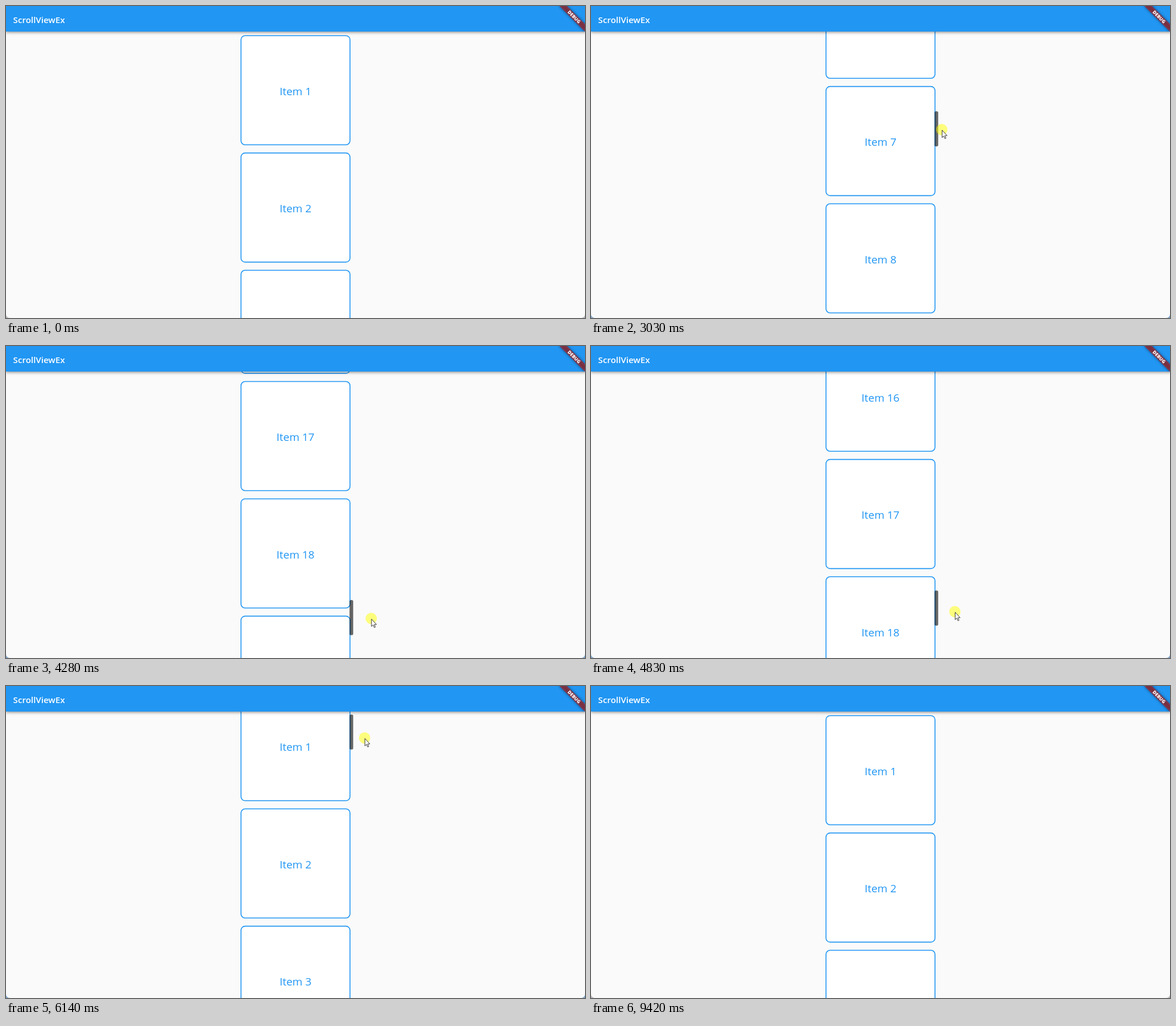
An HTML page for the animation above (9550 ms loop, 1020 px wide and 549 px high).

```html
<!DOCTYPE html>
<html lang="en">
<head>
<meta charset="utf-8">
<title>ScrollViewEx</title>
<style>
  html, body { margin: 0; width: 100%; height: 100%; overflow: hidden; background: #fafafa; }
  #stage { position: relative; width: 1020px; height: 549px; overflow: hidden; }
  svg { position: absolute; left: 0; top: 0; font-family: "Open Sans", "Noto Sans", sans-serif; }
  #bar {
    position: absolute; left: 0; top: 0; width: 1020px; height: 45px; background: #2196f3;
    box-shadow: 0 1.6px 3.2px -.8px rgba(0,0,0,.2), 0 3.2px 4px rgba(0,0,0,.14), 0 .8px 8px rgba(0,0,0,.12);
  }
  #edge { position: absolute; inset: 0; border-radius: 0 0 7px 7px; box-shadow: 0 0 0 10px; }
</style>
</head>
<body>
<div id="stage">
  <svg width="1020" height="549">
    <g id="list" fill="#2196f3" font-size="19" text-anchor="middle"></g>
    <rect id="thumb" x="605.2" width="6.4" height="61.6" rx="2.5"/>
  </svg>
  <div id="bar"></div>
  <svg width="1020" height="549">
    <text x="12.6" y="30" font-size="15.2" font-weight="600" fill="#fff">ScrollViewEx</text>
    <g transform="translate(1020 0) rotate(45)">
      <rect x="-32" y="22.4" width="64" height="9.6" fill="rgba(0,0,0,.5)" style="filter: blur(2.6px)"/>
      <rect x="-32" y="22.4" width="64" height="9.6" fill="rgba(183,28,28,.627)"/>
      <text y="30.1" font-size="8.16" font-weight="800" fill="#fff" text-anchor="middle">DEBUG</text>
    </g>
    <g id="cursor">
      <circle id="press" cy="-.5" r="10" fill="#ff0" fill-opacity=".5"/>
      <path d="M.5 .5V13.5L3.4 10.8L5.4 15.4L7.3 14.6L5.4 10.1H9.3Z" fill="#fff" stroke="#222" stroke-width=".9"/>
    </g>
  </svg>
  <div id="edge"></div>
</div>
<script>
const LOOP = 9550, STEP = 70;
const PITCH = 206.4, ITEMS = 20, VIEW_TOP = 45, VIEW_HEIGHT = 504.2;
const el = id => document.getElementById(id);

el('list').innerHTML = Array.from({ length: ITEMS }, (_, i) => `
  <g transform="translate(0 ${i * PITCH})">
    <rect x="414" y="52.2" width="192" height="192" rx="7.2" fill="#fff" stroke="#2196f3" stroke-width="1.6"/>
    <text x="510" y="156.8">Item ${i + 1}</text>
  </g>`).join('');

const linear = u => u;
const easeIn = p => u => u ** p;
const easeOut = p => u => 1 - (1 - u) ** p;
const smooth = u => u * u * (3 - 2 * u);

// time, [cursor x, cursor y, scroll offset], easing towards the next key
const motion = [
  [310, [971, 528, 0], easeOut(1.6)],
  [1230, [599, 56, 0], smooth],
  [1720, [553, 227, 0], smooth],
  [2210, [609, 78, 0], linear],
  [2610, [609, 78, 0], easeIn(1.3)],
  [3030, [618, 218, 1149], easeOut(1.3)],
  [3530, [632, 397, 2662], linear],
  [3790, [632, 397, 2662], linear],
  [3860, [633, 399, 2681], smooth],
  [4560, [649, 524, 3624], linear],
  [4690, [649, 524, 3624], linear],
  [4830, [641, 468, 3155], easeOut(2)],
  [5240, [640, 420, 2758], linear],
  [5370, [640, 420, 2758], easeIn(1.3)],
  [5720, [628, 158, 612], easeOut(2.5)],
  [6360, [632, 87, 0], linear],
  [6490, [632, 87, 0], smooth],
  [7050, [679, 210, 0], linear],
  [7590, [679, 210, 0], easeIn(1.5)],
  [8360, [957, 537, 0], linear],
];

const thumbOpacity = [
  [2140, [0], linear],
  [2420, [.5], linear],
  [2610, [.5], linear],
  [2680, [.6], linear],
  [6490, [.6], linear],
  [6700, [.1], linear],
  [6840, [.1], linear],
  [7050, [.03], linear],
  [7320, [.03], linear],
  [7390, [0], linear],
];

function sample(keys, t) {
  const next = keys.findIndex(key => key[0] > t);
  if (next === 0) return keys[0][1];
  if (next < 0) return keys.at(-1)[1];
  const [t0, from, ease] = keys[next - 1], [t1, to] = keys[next];
  const k = ease((t - t0) / (t1 - t0));
  return from.map((v, i) => v + (to[i] - v) * k);
}

// Movement advances in fixed steps counted from the start of each burst.
const bursts = [0, 310, 1300, 2280, 2680, 3860, 4760, 5440, 6560, 7390, 7660, 9420];
function stepped(t) {
  const start = bursts.findLast(b => b <= t);
  return start + Math.floor((t - start) / STEP) * STEP;
}

function draw(time) {
  const t = stepped(time);
  const [x, y, scroll] = sample(motion, t);
  el('list').setAttribute('transform', `translate(0 ${-scroll})`);
  el('thumb').setAttribute('y', VIEW_TOP + scroll * VIEW_HEIGHT / (PITCH * ITEMS));
  el('thumb').setAttribute('fill-opacity', sample(thumbOpacity, t)[0]);
  el('cursor').setAttribute('transform', `translate(${x} ${y})`);
  el('cursor').style.display = time >= 310 && time < 8430 ? '' : 'none';
  el('press').style.display = time >= 2680 && time < 6560 ? '' : 'none';
  el('edge').style.color = time >= 2680 && time < 9420 ? '#7fa8cf' : '#b8b8b8';
}

const began = performance.now();
function frame() {
  draw((performance.now() - began) % LOOP);
  requestAnimationFrame(frame);
}
frame();
</script>
</body>
</html>
```
